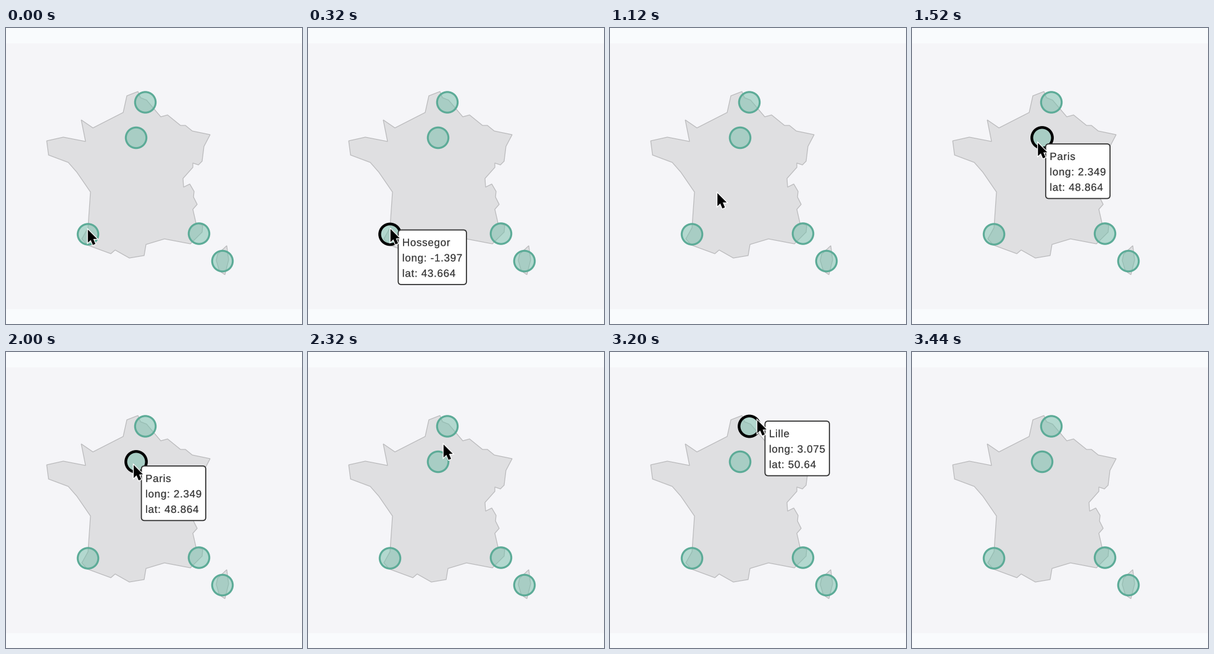
A matplotlib script for the animation above (4 s loop, 480 by 480 pixels).

```python
import numpy as np
import matplotlib.pyplot as plt
from matplotlib.animation import FuncAnimation
from matplotlib.patches import Circle, FancyBboxPatch, PathPatch, Polygon, Rectangle
from matplotlib.path import Path
from matplotlib.textpath import TextPath
from matplotlib.transforms import Affine2D

SIZE, DPI = 480, 100
STEP, FRAMES = 80, 50
PX = 72 / DPI  # one pixel in points

GREEN = "#5cab97"
MARKER_FILL = (0.45, 0.74, 0.66, 0.5)
FONT = {"family": "Liberation Sans"}
FONT_SIZE, TRACKING = 17, 0.7
BOX_HEIGHT, LINE_HEIGHT = 88.5, 25
BOX_OFFSET = np.array([12.3, 2.5])

# corner points of the coast and borders
MAINLAND = [
    (214, 103), (218, 113), (228, 117), (251, 144), (262, 141), (283, 158),
    (291, 158), (302, 167), (331, 173), (321, 192), (318, 216), (312, 222),
    (303, 219), (303, 226), (287, 244), (288, 258), (298, 253), (305, 265),
    (304, 274), (310, 286), (303, 294), (308, 316), (319, 320), (318, 331),
    (299, 350), (257, 342), (227, 351), (224, 369), (200, 373), (177, 360),
    (170, 366), (132, 352), (123, 342), (133, 324), (137, 266), (115, 234),
    (101, 218), (69, 206), (66, 183), (93, 177), (129, 184), (122, 149),
    (141, 162), (190, 137), (196, 110),
]
CORSICA = [(358, 353), (361, 376), (355, 400), (346, 394), (341, 377), (343, 367)]

# marker centre and tooltip lines
PLACES = [
    ((226, 120.5), ("Lille", "long: 3.075", "lat: 50.64")),
    ((211, 178), ("Paris", "long: 2.349", "lat: 48.864")),
    ((133, 334.5), ("Hossegor", "long: -1.397", "lat: 43.664")),
    ((313, 333.5), ()),
    ((351, 378), ()),
]

# pointer stops: time in ms, x, y
STOPS = [
    (0, 133, 326), (320, 134, 325), (800, 134, 325), (1520, 204.5, 185.5),
    (1920, 205, 184.3), (2720, 223.8, 113.8), (3160, 223.8, 113.8), (3440, 452, 38),
]
HOVER_START, EXIT = 240, 3440
HOVER_RADIUS = 18


def pointer_at(t):
    """Eased hops between the stops, each bowed slightly to the right."""
    for (t0, *a), (t1, *b) in zip(STOPS, STOPS[1:]):
        if t <= t1:
            break
    a, b = np.array(a), np.array(b)
    u = min((t - t0) / (t1 - t0), 1)
    bow = 0.08 * abs(b[1] - a[1]) * np.sin(np.pi * u)
    return a + (b - a) * u * u * (3 - 2 * u) + (bow, 0)


def glyph_path(text):
    return TextPath((0, 0), text, size=FONT_SIZE, prop=FONT)


def advance(char):
    return glyph_path(char + "|").get_extents().x1 - glyph_path("|").get_extents().x1


def tracked_text(text, x, baseline):
    glyphs = []
    for char in text:
        if char != " ":
            place = Affine2D().scale(1, -1).translate(x, baseline)
            glyphs.append(place.transform_path(glyph_path(char)))
        x += advance(char) + TRACKING
    return Path.make_compound_path(*glyphs)


def make_tooltip(lines):
    path = Path.make_compound_path(
        *[tracked_text(s, 6.5, 26 + LINE_HEIGHT * i) for i, s in enumerate(lines)])
    width = path.get_extents().x1 + 7.5
    box = FancyBboxPatch((0, 0), width, BOX_HEIGHT,
                         boxstyle="round,pad=0,rounding_size=5",
                         fc="white", ec="#2c2c2c", lw=1.7 * PX, zorder=5)
    text = PathPatch(path, fc="#333333", ec="#333333", lw=0.25 * PX, zorder=6)
    return ax.add_patch(box), ax.add_patch(text)


fig = plt.figure(figsize=(SIZE / DPI, SIZE / DPI), dpi=DPI, facecolor="#f9fbfd")
ax = fig.add_axes([0, 0, 1, 1])
ax.set_xlim(0, SIZE)
ax.set_ylim(SIZE, 0)
ax.axis("off")

ax.add_patch(Rectangle((0, 25), SIZE, 431, fc="#f5f5f8", lw=0))
for outline in (MAINLAND, CORSICA):
    ax.add_patch(Polygon(outline, fc="#dfdfe1", ec="#b9b9bb", lw=1.2 * PX, zorder=2))

markers = [ax.add_patch(Circle(centre, 16.7, fc=MARKER_FILL, zorder=3))
           for centre, _ in PLACES]
tooltips = [make_tooltip(lines) if lines else () for _, lines in PLACES]

ARROW = [(0, 1.5), (0, 21.5), (4.5, 17.3), (8, 25.5), (11.6, 24),
         (8.2, 16), (14.2, 15.8)]
pointer = [
    ax.add_patch(Polygon(ARROW, fc="white", ec="white", lw=3 * PX, zorder=8)),
    ax.add_patch(Polygon(ARROW, fc="black", ec="black", lw=0.5 * PX, zorder=9)),
]


def place(parts, position, visible):
    for part in parts:
        part.set_transform(Affine2D().translate(*position) + ax.transData)
        part.set_visible(visible)


def draw(frame):
    t = frame * STEP
    tip = pointer_at(t)
    place(pointer, tip, t < EXIT)
    for (centre, _), marker, tooltip in zip(PLACES, markers, tooltips):
        near = np.hypot(*(tip - centre)) < HOVER_RADIUS
        hover = bool(near and HOVER_START <= t < EXIT)
        marker.set_edgecolor("black" if hover else GREEN)
        marker.set_linewidth((4.4 if hover else 3.1) * PX)
        place(tooltip, tip + BOX_OFFSET, hover)
    return []


anim = FuncAnimation(fig, draw, frames=FRAMES, interval=STEP, repeat=True,
                     repeat_delay=0, blit=False)
plt.show()
```
